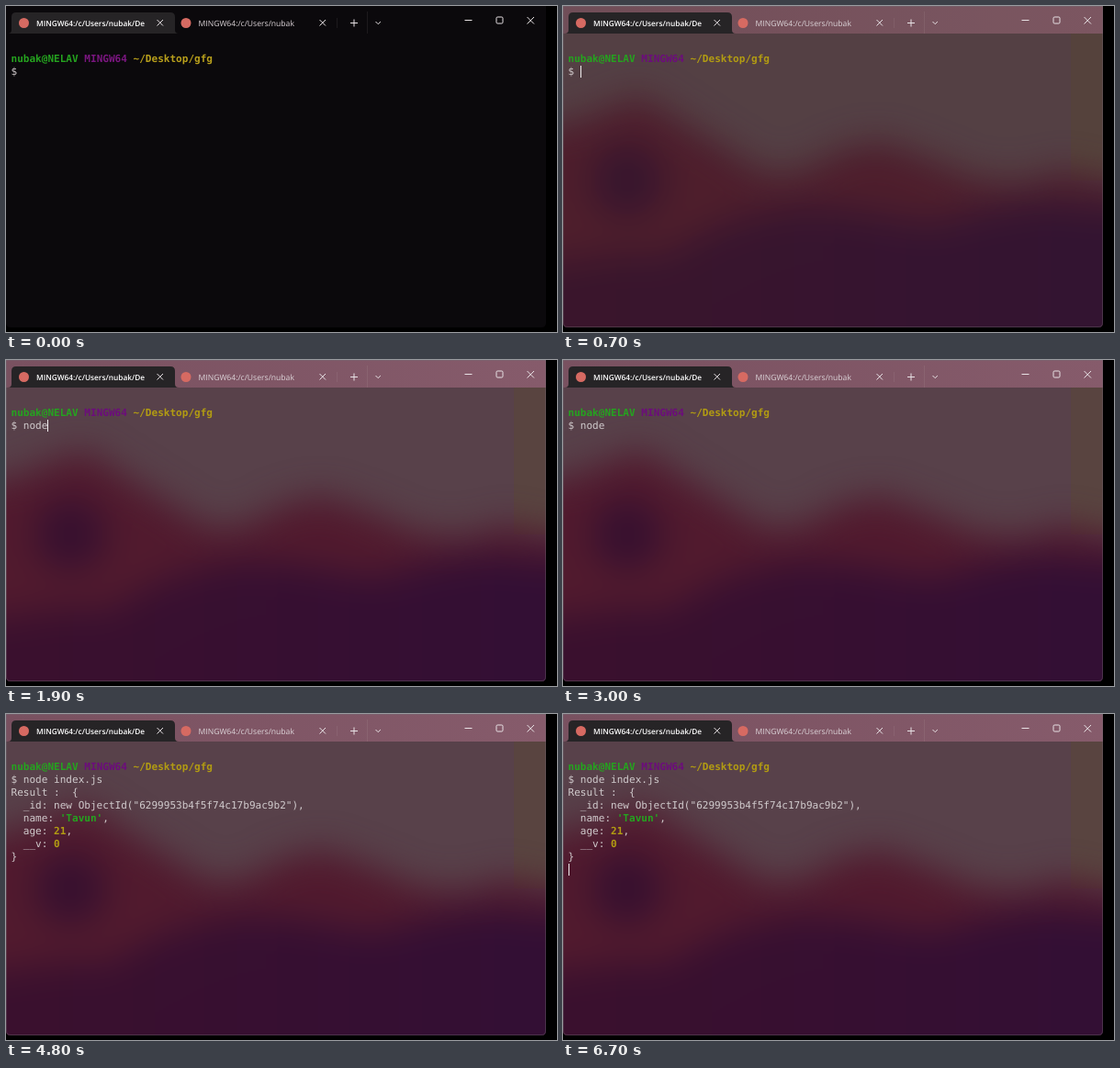
An HTML page that plays this animation: 600x355 px, repeating every 7 s.

```html
<!DOCTYPE html>
<html lang="en">
<head>
<meta charset="utf-8">
<title>Terminal session</title>
<style>
  html, body { margin: 0; width: 100%; height: 100%; overflow: hidden; background: #000; }
  svg { display: block; width: 600px; height: 355px; }
  text { white-space: pre; text-rendering: geometricPrecision; }
  .mono { font: 11.05px "DejaVu Sans Mono", monospace; font-variant-ligatures: none; fill: #d0cacc; }
  .tab { font: 8.6px "Open Sans", "Noto Sans", sans-serif; fill: #dcd4d8; }
  .tab.active { font-size: 8.3px; font-weight: 600; fill: #fff; }
  .b { font-weight: bold; }
  .green { fill: #25a31f; }
  .purple { fill: #7b1680; }
  .yellow { fill: #b9a01c; }
  .lit .purple { fill: #6c0c7c; }
  .lit .yellow { fill: #b29c12; }
  .icons { fill: none; stroke: #e8e2e5; stroke-width: 1; }
</style>
</head>
<body>
<svg viewBox="0 0 600 355">
  <defs>
    <clipPath id="window"><path d="M0 0H588V345Q588 350 583 350H5Q0 350 0 345Z"/></clipPath>
    <clipPath id="body"><rect y="30" width="588" height="320"/></clipPath>
    <filter id="soft" x="-20%" y="-40%" width="140%" height="180%" color-interpolation-filters="sRGB">
      <feGaussianBlur stdDeviation="19"/>
    </filter>
    <linearGradient id="bar">
      <stop offset="0" stop-color="#795160"/>
      <stop offset="1" stop-color="#865b6b"/>
    </linearGradient>
    <linearGradient id="depth">
      <stop offset="0" stop-color="#3b102d"/>
      <stop offset="1" stop-color="#320f35"/>
    </linearGradient>
  </defs>
  <rect width="600" height="355"/>
  <g clip-path="url(#window)">
    <rect width="588" height="350" fill="#0b090c"/>

    <g id="glass">
      <rect width="588" height="30" fill="url(#bar)"/>
      <g clip-path="url(#body)">
        <rect y="30" width="588" height="320" fill="#58414a"/>
        <rect x="553" y="30" width="35" height="160" fill="#594440"/>
        <g filter="url(#soft)">
          <path fill="#511a2e" d="M-60 135L0 130L50 110L85 97L120 120L160 145L220 182L260 180L300 158L345 147L400 167L450 188L500 192L545 178L588 190H650V420H-60Z"/>
          <path fill="url(#depth)" d="M-60 285L0 280L60 270L110 272L160 245L200 230L260 218L330 225L400 238L450 225L520 212L588 218H650V420H-60Z"/>
          <ellipse cx="70" cy="190" rx="38" ry="39" fill="#37102f"/>
        </g>
      </g>
      <rect id="haze" width="588" height="350" fill="#3a3a24" opacity=".13"/>
      <path d="M.5 0V345Q.5 349.500 5 349.500H583Q587.500 349.500 587.500 345V0M0 .5H588" fill="none" stroke="#706870" stroke-opacity=".4"/>
    </g>

    <path d="M2 30Q6 30 6 26V12Q6 7 11 7H179Q184 7 184 12V26Q184 30 188 30Z" fill="#262426"/>
    <circle cx="19.5" cy="18.5" r="5.5" fill="#d66a62"/>
    <circle cx="196" cy="18.5" r="5.5" fill="#d66a62"/>
    <text class="tab active" x="33" y="22">MINGW64:/c/Users/nubak/De</text>
    <text class="tab" x="209.5" y="22">MINGW64:/c/Users/nubak</text>
    <g class="icons">
      <path d="M164.5 15l6.5 6.5m0-6.5l-6.5 6.5M341.5 15l6.5 6.5m0-6.5l-6.5 6.5"/>
      <path d="M375 18.5h8m-4-4v8M402.5 17l2.7 2.7l2.7-2.7M499.500 15.500h8"/>
      <rect x="534" y="12" width="7" height="7" rx="1.2"/>
      <path d="M567.5 12l7.500 7.500m0-7.500l-7.500 7.500"/>
      <path d="M360.500 13v11M393.500 6v24" stroke-opacity=".08"/>
    </g>

    <g class="mono" id="screen">
      <text x="5.5" y="61" class="b"><tspan class="green">nubak@NELAV</tspan> <tspan class="purple">MINGW64</tspan> <tspan class="yellow">~/Desktop/gfg</tspan></text>
      <text x="5.5" y="75" id="command">$ </text>
      <g id="output">
        <text x="5.5" y="89">Result :  {</text>
        <text x="5.5" y="103">  _id: new ObjectId("6299953b4f5f74c17b9ac9b2"),</text>
        <text x="5.5" y="117">  name: <tspan class="green b">'Tavun'</tspan>,</text>
        <text x="5.5" y="131">  age: <tspan class="yellow b">21</tspan>,</text>
        <text x="5.5" y="145">  __v: <tspan class="yellow b">0</tspan></text>
        <text x="5.5" y="159">}</text>
      </g>
      <rect id="cursor" width="1" height="13" fill="#f2eef0"/>
    </g>
  </g>
</svg>
<script>
  const LOOP = 7000, COL = 6.653, LINE = 14;
  const COMMAND = "node index.js";
  // [time, typed characters]
  const typing = [[0, 0], [1400, 1], [1700, 2], [1800, 3], [1900, 4], [2500, 5],
    [3100, 6], [3400, 7], [3500, 8], [3800, COMMAND.length]];
  // [time, cursor visible]
  const blinks = [[0, 0], [600, 1], [1100, 0], [1300, 1], [2400, 0], [2500, 1], [3000, 0],
    [3100, 1], [4800, 0], [4900, 1], [5400, 0], [5900, 1], [6500, 0], [6700, 1]];
  // [time, opacity of the see-through backdrop]
  const fade = [[0, 0], [600, 0.03], [700, 1]];

  const el = id => document.getElementById(id);
  const show = (id, on) => el(id).setAttribute("visibility", on ? "inherit" : "hidden");
  const at = (steps, t) => steps.filter(([start]) => start <= t).pop()[1];

  function draw(now) {
    const t = now % LOOP;
    const typed = at(typing, t);
    const row = t < 4300 ? 1 : t < 4800 ? 2 : 8;
    const col = row === 1 ? 2 + typed : 0;

    el("command").textContent = "$ " + COMMAND.slice(0, typed);
    el("cursor").setAttribute("x", Math.round(5.5 + col * COL));
    el("cursor").setAttribute("y", 51 + row * LINE);
    el("screen").classList.toggle("lit", t >= 700);
    el("glass").setAttribute("opacity", at(fade, t));
    show("cursor", at(blinks, t));
    show("output", t >= 4800);
    show("haze", t < 1300);
    requestAnimationFrame(draw);
  }
  draw(performance.now());
</script>
</body>
</html>
```
